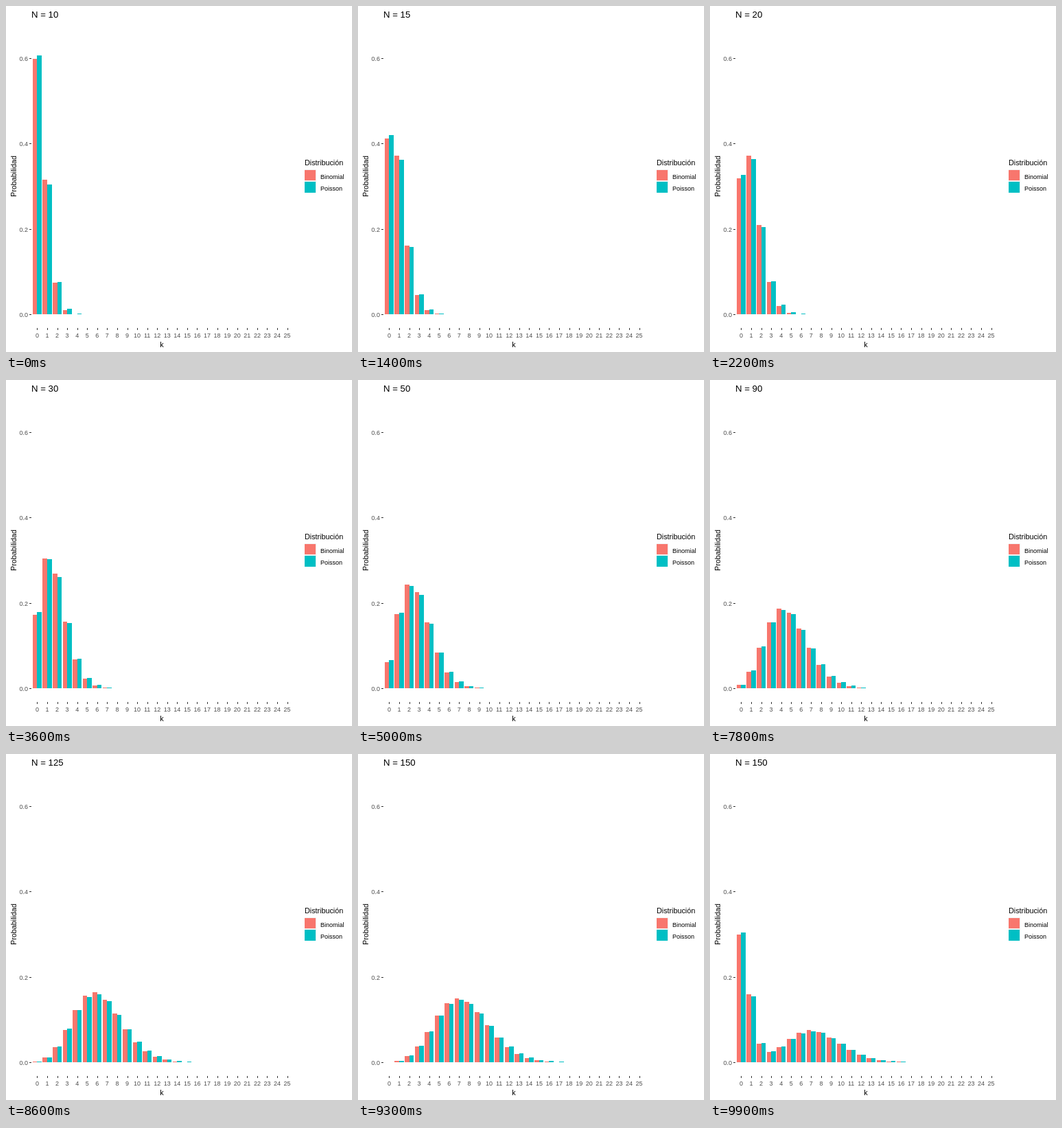
An HTML page with a canvas that plays this animation: 504x504 px, repeating every 10 s.

```html
<!DOCTYPE html>
<html lang="es">
<head>
<meta charset="utf-8">
<style>
  html, body { margin: 0; width: 100%; height: 100%; overflow: hidden; background: #fff; }
  canvas { display: block; }
</style>
</head>
<body>
<canvas id="chart" width="504" height="504"></canvas>
<script>
const ctx = document.getElementById('chart').getContext('2d');
const SIZES = [10, 15, 20, 25, 30, 40, 50, 60, 70, 80, 90, 100, 125, 150];
const P = 0.05, MAX_K = 25, LOOP = 10000, BLEND = 100;
const RED = '#F8766D', TEAL = '#00BFC4', GREY = '#4D4D4D';
const STEP = 14.568, LEFT = 38.839, HALF = STEP * 0.45, BASE = 449.125, SCALE = 622.2;

const yOf = p => Math.round(BASE - SCALE * p);

// Probabilities for k = 0..MAX_K, built by recurrence.
function series(first, ratio) {
  const out = [first];
  for (let k = 1; k <= MAX_K; k++) out.push(out[k - 1] * ratio(k));
  return out;
}
const states = SIZES.map(n => [
  series((1 - P) ** n, k => Math.max(0, n - k + 1) / k * P / (1 - P)),
  series(Math.exp(-n * P), k => n * P / k)
]);

// Time at which state i stops holding and blends into the next.
const holdEnd = i => i < 3 ? 600 + 800 * i : 2200 + 700 * (i - 2);

function rect(x, y, w, h, color) {
  ctx.fillStyle = color;
  ctx.fillRect(x, y, w, h);
}

function text(str, x, y, size, color = '#000', align = 'left') {
  ctx.font = `${size}px "Liberation Sans", Arial, sans-serif`;
  ctx.fillStyle = color;
  ctx.textAlign = align;
  ctx.fillText(str, x, y);
}

function drawAxes() {
  for (const p of [0, 0.2, 0.4, 0.6]) {
    rect(34, yOf(p), 3, 1, '#333');
    text(p.toFixed(1), 32, yOf(p) + 4, 9, GREY, 'right');
  }
  for (let k = 0; k <= MAX_K; k++) {
    const x = LEFT + HALF + STEP * k;
    rect(Math.round(x), 469, 1, 3, '#333');
    text(k, x, 483, 9, GREY, 'center');
  }
  text('k', 227, 497, 10.75, '#000', 'center');
  ctx.save();
  ctx.translate(15, 248);
  ctx.rotate(-Math.PI / 2);
  text('Probabilidad', 0, 0, 10.75, '#000', 'center');
  ctx.restore();
}

function drawLegend() {
  text('Distribución', 435, 232, 10.75);
  rect(435, 238, 17, 34, '#F2F2F2');
  rect(435, 239, 16, 15, RED);
  rect(435, 256, 16, 16, TEAL);
  text('Binomial', 458, 252, 9);
  text('Poisson', 458, 269, 9);
}

function drawBars(from, to) {
  from.forEach((probs, s) => probs.forEach((p, k) => {
    const x = LEFT + STEP * k + HALF * s;
    const x0 = Math.round(x), x1 = Math.round(x + HALF);
    const top = yOf((p + to[s][k]) / 2);
    rect(x0, top, x1 - x0, yOf(0) - top, s ? TEAL : RED);
  }));
}

function draw() {
  const t = performance.now() % LOOP;
  let i = 0;
  while (t >= holdEnd(i) + BLEND) i++;
  const next = t >= holdEnd(i) ? (i + 1) % SIZES.length : i;
  rect(0, 0, 504, 504, '#fff');
  text('N = ' + SIZES[i], 37, 17, 13.2);
  drawAxes();
  drawLegend();
  drawBars(states[i], states[next]);
  requestAnimationFrame(draw);
}
draw();
</script>
</body>
</html>
```
